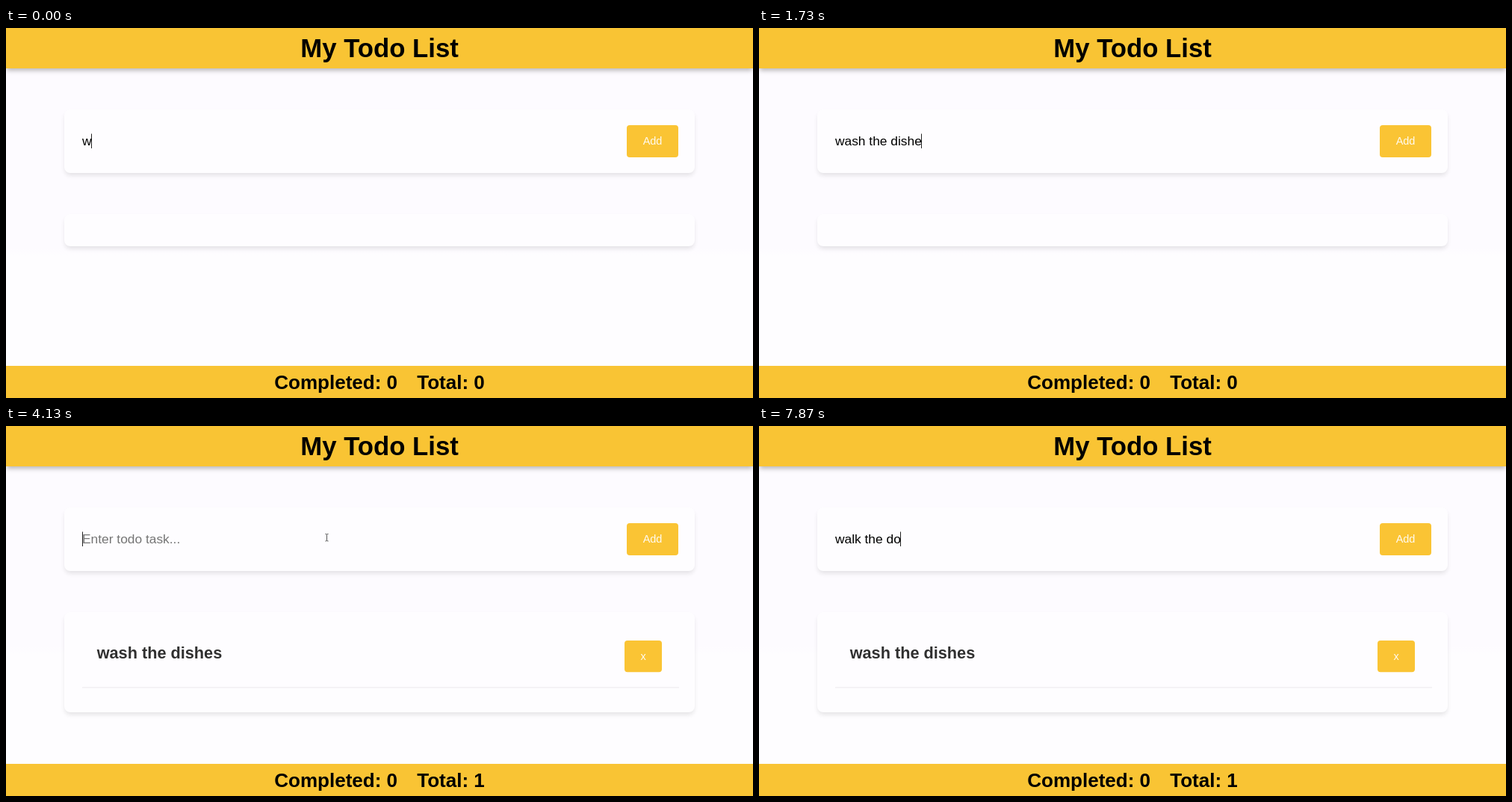
An HTML page for the animation above (8000 ms loop, 1000 by 495 pixels).

```html
<!DOCTYPE html>
<html lang="en">
<head>
<meta charset="utf-8">
<title>My Todo List</title>
<style>
  html, body { margin: 0; width: 100%; height: 100%; overflow: hidden; }
  body { position: relative; background: linear-gradient(#fdfbff 295px, #fefdff 305px); }
  div, svg { position: absolute; }
  .bar { left: 0; width: 1000px; background: #f9c434; }
  .header { top: 0; height: 54px; box-shadow: 0 4px 6px -1px rgba(0, 0, 0, .27); }
  .footer { top: 451.7px; height: 43.3px; }
  .card {
    left: 78px; width: 844px; border-radius: 8px; background: #fefdff;
    box-shadow: 0 4px 6px -1px rgba(0, 0, 0, .11);
  }
  .entry { top: 108.5px; height: 85.7px; }
  .list { top: 248.6px; height: 43.2px; }
  svg { left: 0; top: 0; font-family: "Liberation Sans", Arial, sans-serif; }
  .title { font-size: 34.72px; font-weight: bold; }
  .count { font-size: 26.04px; font-weight: bold; }
  .task { font-size: 21.7px; font-weight: bold; fill: #303030; }
  .input { font-size: 17.36px; white-space: pre; }
  .button { fill: #fac434; }
  .label { font-size: 14.47px; fill: #fffaf0; text-anchor: middle; }
</style>
</head>
<body>
<div class="bar header"></div>
<div class="card entry"></div>
<div class="card list" id="list"></div>
<div class="bar footer"></div>
<svg width="1000" height="495" viewBox="0 0 1000 495">
  <text class="title" x="500" y="39" text-anchor="middle">My Todo List</text>
  <text class="input" id="input" x="102" y="157.2"></text>
  <rect id="caret" y="141.5" width="1" height="19.5" fill="#222"/>
  <rect class="button" id="add" x="831" y="130" width="69" height="43" rx="4"/>
  <text class="label" x="865.5" y="156.3">Add</text>
  <g id="item">
    <text class="task" x="121.7" y="311.4">wash the dishes</text>
    <rect class="button" x="828" y="287" width="50" height="42.3" rx="4"/>
    <text class="label" x="853" y="313">x</text>
    <rect x="102" y="349" width="799" height="1.6" fill="#f3f1f4"/>
  </g>
  <text class="count" x="359.2" y="482.5">Completed: 0</text>
  <text class="count" id="total" x="550.2" y="482.5"></text>
  <g id="pointer">
    <path id="arrow" d="M0 0V8.2L1.8 6.6L3 9.5L4.5 8.9L3.3 6.1H5.6Z" fill="#000" stroke="#fff" stroke-width=".4"/>
    <path id="hand" d="M-.8 .8Q0 -.5 .8 .8V4L4.6 4.8Q5.6 5.1 5.4 6.2L4.7 9.7H0L-2.8 6.4Q-2.6 5.1 -.8 6.2Z"
      fill="#fff" stroke="#333" stroke-width=".8"/>
    <path id="beam" d="M-2 -4.8Q0 -4.8 0 -4Q0 -4.8 2 -4.8M0 -4V4M-2 4.8Q0 4.8 0 4Q0 4.8 2 4.8"
      fill="none" stroke="#444" stroke-width=".9"/>
  </g>
</svg>
<script>
const LOOP = 8000, ADDED = 3730, FOCUSED = 4130, BLINK = 600;
const el = id => document.getElementById(id);
const show = (node, visible) => node.setAttribute("visibility", visible ? "visible" : "hidden");

// Each time types one more character.
const phrases = [
  { text: "wash the dishes", start: 0,
    keys: [0, 200, 330, 470, 600, 930, 1000, 1130, 1270, 1330, 1470, 1530, 1670, 1730, 1870] },
  { text: "walk the do", start: ADDED,
    keys: [6200, 6330, 6470, 6600, 6730, 7000, 7130, 7200, 7330, 7800, 7870] }
];

// Pointer stops: time, x, y.
const path = [
  [3000, 560, 245], [3200, 562, 245], [3470, 855, 233], [3600, 860, 149], [3869, 860, 149],
  [3870, 660, 148.5], [3929, 660, 148.5], [3930, 433, 148.5], [4069, 433, 148.5], [4070, 429.5, 149.2]
];

function pointerAt(t) {
  const next = path.findIndex(stop => stop[0] > t);
  if (next < 0) return path[path.length - 1].slice(1);
  const [t0, x0, y0] = path[next - 1], [t1, x1, y1] = path[next];
  const k = (t - t0) / (t1 - t0);
  return [x0 + (x1 - x0) * k, y0 + (y1 - y0) * k];
}

function drawInput(t) {
  const { text, keys } = phrases[t < ADDED ? 0 : 1];
  const typed = keys.filter(key => key <= t).length;
  const input = el("input");
  input.textContent = typed ? text.slice(0, typed) : "Enter todo task...";
  input.setAttribute("fill", typed ? "#000" : "#757575");
  const since = typed ? keys[typed - 1] : FOCUSED;
  const focused = t < ADDED || t >= FOCUSED;
  show(el("caret"), focused && Math.floor((t - since) / BLINK) % 2 === 0);
  const width = typed ? input.getSubStringLength(0, typed) : 0;
  el("caret").setAttribute("x", Math.round(101.6 + width));
}

function drawPointer(t) {
  const visible = t >= 3000 && t < 6200;
  const [x, y] = visible ? pointerAt(t) : [0, 0];
  const onAdd = x > 831 && x < 900 && y > 130 && y < 173;
  const overInput = y > 130 && y < 173 && !onAdd;
  el("pointer").setAttribute("transform", `translate(${x} ${y})`);
  show(el("arrow"), visible && !onAdd && !overInput);
  show(el("hand"), visible && onAdd);
  show(el("beam"), visible && overInput);
  el("add").style.fill = onAdd ? "#f9c742" : "";
}

function draw(t) {
  const added = t >= ADDED;
  drawInput(t);
  drawPointer(t);
  show(el("item"), added);
  el("list").style.height = added ? "134.6px" : "";
  el("total").textContent = "Total: " + (added ? 1 : 0);
}

const begin = performance.now();
function tick() {
  draw((performance.now() - begin) % LOOP);
  requestAnimationFrame(tick);
}
tick();
</script>
</body>
</html>
```
